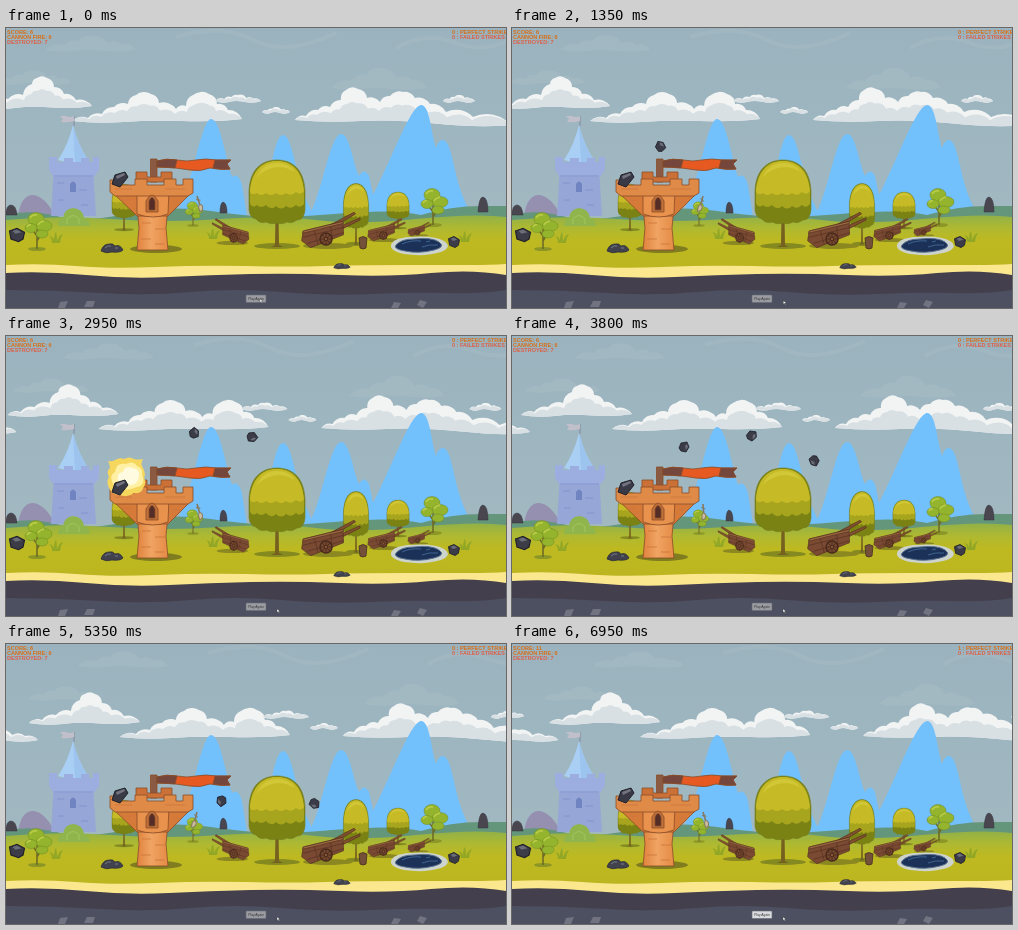
Write an HTML page that moves like this. It is 500 by 280 pixels and loops after 7 s.

```html
<!DOCTYPE html>
<html lang="en">
<head>
<meta charset="utf-8">
<title>Castle cannon</title>
<style>
html, body { margin: 0; width: 100%; height: 100%; overflow: hidden; background: #9fb5bf; }
svg { display: block; width: 100vw; height: 100vh; }
text { font: 800 5.5px "Liberation Sans", Arial, sans-serif; }
</style>
</head>
<body>
<svg viewBox="0 0 500 280">
<defs>
  <linearGradient id="sky" x2="0" y2="1"><stop stop-color="#9ab3be"/><stop offset="1" stop-color="#a5bbc3"/></linearGradient>
  <linearGradient id="grass" x2="0" y2="1"><stop stop-color="#92b148"/><stop offset=".2" stop-color="#aeb931"/><stop offset=".4" stop-color="#beb921"/><stop offset="1" stop-color="#bbb41f"/></linearGradient>
  <linearGradient id="brick" x2="1" y2="0"><stop stop-color="#e0823d"/><stop offset=".45" stop-color="#f0a463"/><stop offset="1" stop-color="#e58b46"/></linearGradient>
  <g id="tree">
    <ellipse cy="24" rx="23" ry="3" fill="#858a20"/>
    <path d="M-1.500-5h3L2 23l4 2h-12l4-2z" fill="#75601f"/>
    <path d="M-28-31C-27-54-14-62 0-62S27-54 28-31V-12Q27-2 20-2 15 2 10 0 5 3 0 1-6 3-11 0-17 2-21-3-27-4-28-12z" fill="#7b8214" stroke="#767c1c" stroke-width=".6"/>
    <path d="M-27-30C-26-52-14-61 0-61S26-52 27-30V-18q-4 5-8 1-5 5-10 1-5 5-10 0-5 5-10-1-5 4-9 0-5 4-7-2z" fill="#a7a51d"/>
    <path d="M-27-31C-25-53-13-61 0-61S25-53 27-31q-3 5-8 1-5 5-10 1-5 4-10 0-5 4-10 0-5 4-9 0-5 3-7-1z" fill="#c6bb26"/>
    <path d="M-21-44Q-14-59 0-59q12 0 18 9Q4-58-8-53q-8 3-13 9z" fill="#d2c737"/>
  </g>
  <g id="bush">
    <ellipse cy="30" rx="9" ry="2" fill="#8c9626"/>
    <path d="M0 30V5M0 22L8 8M0 17L-7 7" fill="none" stroke="#6f6c26" stroke-width="1.6"/>
    <g fill="#93b42c" stroke="#6f8a25" stroke-width=".5">
      <ellipse cx="-1" rx="8" ry="6.500"/><ellipse cx="7" cy="7" rx="8" ry="5.500"/><ellipse cx="-6" cy="9" rx="6" ry="4.500"/><ellipse cx="5" cy="15" rx="6" ry="4"/>
    </g>
    <path d="M-7-1q2-4 7-3M1 6q1-3 6-4M-10 8q1-3 4-2" fill="none" stroke="#b6ca46" stroke-width="1.8"/>
  </g>
  <g id="cart">
    <ellipse cx="1" cy="11" rx="25" ry="3" fill="#8b8821"/>
    <g transform="rotate(-15)" stroke="#54301f" stroke-width=".6">
      <path d="M2-3L36-8l0 2L3 1zM6-9L32-15l1 2L8-6z" fill="#80502f"/>
      <path d="M-26-1L-22-10 19-9 16 4-19 8z" fill="#7a4a33"/>
      <path d="M-24-4L18-3M-21 3L17 2M-11-10L-11 7M6-9L4 5" fill="none"/>
      <path d="M-22-10L19-9 19-7-23-8z" fill="#a06d43"/>
    </g>
    <g fill="none" stroke="#4a2a1c">
      <circle cx="-1" cy="4" r="6" fill="#74482f" stroke-width="1.5"/>
      <path d="M-1-2V10M-7 4H5M-5 0L3 8M3 0L-5 8" stroke-width=".8"/>
      <circle cx="-1" cy="4" r="1.500" fill="#a06b45"/>
    </g>
  </g>
  <g id="rock">
    <path d="M-5-3L0-5 5-2 4 3 1 5-4 3z" fill="#3b3c48" stroke="#20202a" stroke-width=".8"/>
    <path d="M-3-3L0-4 3-2-1-1z" fill="#6b6d79"/>
  </g>
  <g id="stones">
    <path d="M-11 3q2-7 8-7 4-1 6 2 5-2 8 4-3 3-11 2-6 2-11-1z" fill="#41424e" stroke="#282934" stroke-width=".7"/>
    <path d="M-7 0q3-3 6-2M3 0l3 0" stroke="#747886" fill="none"/>
  </g>
  <path id="tuft" d="M-5 4q0-5-3-7 5 1 5 5 0-7 2-9 1 3 1 9 2-6 6-7-3 4-3 9z" fill="#93a726"/>
</defs>

<rect width="500" height="280" fill="url(#sky)"/>
<g id="haze" opacity=".25"></g>
<g id="clouds"></g>

<!-- Far scenery -->
<g fill="#72c0fc">
  <path d="M250 195C263 170 266 108 277 107c9 0 13 40 22 62l12 26zM299 195C316 172 323 107 335 106c9 0 12 30 18 42q5-9 10 0l10 47z"/>
  <path d="M165 195C186 168 194 92 205 91c9 0 14 36 21 58q6-5 10 8l6 38z"/>
  <path d="M350 195C376 162 401 79 415 77c9 0 10 28 15 43 3-10 10-12 14 2 6 19 8 48 28 73z"/>
</g>
<path d="M12 188Q15 167 27 167 39 168 49 188z" fill="#958fb0"/>
<path d="M0 187Q22 181 50 188T120 186 205 183 270 189 340 185 415 187Q445 178 475 178l25 0v29H0z" fill="#64967b"/>
<g fill="#4a4650" stroke="#34333d" stroke-width=".5">
  <path d="M0 187q0-10 5-10t6 10zM214 185q0-10 3-11 4 1 4 11zM472 184q1-15 5-15 5 1 5 15z"/>
</g>
<path d="M0 192Q50 187 105 191T215 191 310 192 410 191 500 189V250H0z" fill="url(#grass)"/>

<!-- Blue castle -->
<path d="M68 98V88" stroke="#8486a0"/>
<path d="M68 88q-5 2-8 0l-6 0 3 3-2 3q6 1 13-1z" fill="#c1bfc9"/>
<path d="M48 139H87L90 188H45z" fill="#95a6d7"/>
<path d="M67 97Q72 117 82 132 67 137 52 132 62 117 67 97z" fill="#a9cff4"/>
<path d="M67 97Q72 117 82 132q-6 2-13 3z" fill="#9cc4ef"/>
<path d="M43 129h8v5h7v-4h9v4h8v-4h8v4h4v-5h6v13l-5 7H48l-5-7z" fill="#9cade0"/>
<path d="M48 148H87M51 155h7M73 162h8M52 172h6M75 177h7" stroke="#8293ca"/>
<path d="M64 164v-8q3-5 6 0v8z" fill="#7184c2"/>
<path d="M52 198q0-7 5-8 1-9 10-10 10 1 11 10 5 1 6 8z" fill="#8fb54c"/>
<path d="M61 196v-5q6-7 12 0v5" fill="none" stroke="#a5c45c"/>

<!-- Field -->
<use href="#tree" transform="translate(118 189) scale(.43 .53)"/>
<use href="#tree" transform="translate(392 190) scale(.4 .42)"/>
<use href="#bush" transform="translate(187 178) scale(.65)"/>
<use href="#bush" transform="translate(427 167)"/>
<use href="#bush" transform="translate(31 191)"/>
<use href="#tree" transform="translate(350 199) scale(.45 .7)"/>
<use href="#tree" transform="translate(271 194)"/>
<use href="#tuft" x="208" y="207"/><use href="#tuft" x="51" y="211"/><use href="#tuft" x="460" y="210"/>
<use href="#cart" transform="translate(227 207) scale(-.63 .72)"/>
<use href="#cart" transform="translate(321 207)"/>
<use href="#cart" transform="translate(378 205) scale(.64)"/>
<use href="#cart" transform="translate(412 203) scale(.4)"/>
<path d="M353 210q4-3 8 0l-1 10q-3 2-6 0z" fill="#755039" stroke="#463022" stroke-width=".8"/>
<path d="M385 217q2-7 19-8 24-2 34 4 9 6-3 11-16 5-37 2-14-3-13-9z" fill="#cdd4cd"/>
<path d="M390 217q5-6 18-6 18-2 25 3 7 5-5 8-15 4-29 1-12-2-9-6z" fill="#1c3158" stroke="#5b7190"/>
<path d="M396 216q8-4 19-3M416 219q7-3 16-2M420 214l4-1" fill="none" stroke="#426a97" stroke-width=".9"/>
<use href="#rock" transform="translate(448 214) scale(1.1)"/>
<use href="#rock" transform="translate(11 207) scale(1.5 1.35)"/>
<use href="#stones" x="106" y="220"/>

<!-- Beach and soil -->
<path d="M0 237Q35 235 70 238T150 239 240 238 320 238 400 237 465 237 500 236V262H0z" fill="#fbe78e"/>
<path d="M0 245Q38 243 80 247T163 249 245 246 335 247 425 245 500 247V280H0z" fill="#433f4d"/>
<path d="M0 262Q48 262 95 265T185 264 276 264 365 266 440 265 500 262V280H0z" fill="#4c5060"/>
<path d="M52 280l2-6 8-1-3 7zM78 279l3-6 8 0-2 6zM385 280l3-6 7 1-3 5zM411 277l3-5 7 2-4 6z" fill="#717480"/>
<use href="#stones" transform="translate(336 238) scale(.75 .6)"/>

<!-- Main tower -->
<ellipse cx="150" cy="221" rx="26" ry="4" fill="#7f7d20"/>
<g stroke="#8a4c28" stroke-width=".8" stroke-linejoin="round">
  <path d="M144.500 131h6.500V154h-6.500z" fill="#8b5a43"/>
  <path d="M151 133q10-3 20-1t19 0 21 0l14 0-4 4 3 5q-11 1-20-1-10 4-20 2-16-3-33-3z" fill="#e65a22"/>
  <path d="M151 133q9-3 20-1l-2 8q-9-1-18-1zM209 132l16 0-4 4 3 5q-8 1-17-1z" fill="#74463c"/>
  <path d="M130 151v-7h11v5h14v-5h11v10h-36z" fill="#cb7138"/>
  <path d="M131 178H162L160 200 162 222H131L133 200z" fill="url(#brick)"/>
  <path d="M106 164L131 188H162L186 164z" fill="#d67a39"/>
  <path d="M131 162H163L162 186Q147 192 131 186z" fill="#e8924d"/>
  <path d="M104 152h10v5h15v-6h12v6h17v-6h12v6h7v-6h10v14l-5 3H109l-5-4z" fill="#e08a48"/>
  <path d="M140 184v-11q6-12 12 0v11z" fill="#c0713a"/>
  <path d="M143 182v-9q3-7 6 0v9z" fill="#542d27"/>
  <path d="M109 161H126M159 161h20M136 195h9M149 201h10M135 211h10M149 216h9M116 172l9 0M167 174h7" stroke="#c8743c"/>
</g>
<g id="pendulum" stroke="#87785f" fill="none">
  <path d="M0 0V12" stroke-width="1.6"/><path d="M-2 3L2 5M-2 11q2-4 4 0 0 5-4 5z" fill="#c8bda0"/>
</g>

<!-- Cannon fire -->
<g id="smoke">
  <path d="M-18 14q-3-6 0-11-3-6 1-9 0-4-2-7 4 1 7-1 5-3 9-1 5-3 10 0 4 1 9 0-3 5 0 9 3 6 1 10 3 5-1 10-1 6-9 5-8 6-15 1-6 2-10-6z" fill="#f6d75e"/>
  <path d="M-14 10q-4-9 2-12 1-10 11-8 7-4 11 2 6 2 5 9 4 10-5 12-13 6-24-3z" fill="#fff0a4"/>
  <path d="M-9 7q-2-8 5-9 2-7 10-4 7 1 6 8-1 9-9 9-9 2-12-4z" fill="#fffbe0"/>
</g>
<path d="M106 156L109 147 119 144 122 149 114 159z" fill="#393a46" stroke="#20212a"/>
<path d="M110 148l8-3 1 2-8 4z" fill="#737480"/>
<g id="shots"></g>

<!-- Interface -->
<g fill="#d96e17"><text x="1" y="6" id="score"></text><text x="1" y="11">CANNON FIRE: 6</text><text x="1" y="16" fill="#de5f45">DESTROYED: 7</text></g>
<g fill="#d96e17"><text x="446" y="6" id="perfect"></text><text x="446" y="11" fill="#de5f45">0 : FAILED STRIKES</text></g>
<rect id="button" x="240" y="267" width="20" height="7.500" rx=".7" stroke="#6a6c73" stroke-width=".6"/>
<text x="250" y="272" text-anchor="middle" style="font-size:3.3px;font-weight:400" fill="#333">Play Again</text>
<path id="cursor" d="M0 0v3.500l1-1 1 1.500.6-.4-.9-1.400h1.300z" fill="#fff" stroke="#222" stroke-width=".3"/>
</svg>

<script>
const el = id => document.getElementById(id);
const place = (node, x, y, more = "") => node.setAttribute("transform", `translate(${x} ${y}) ${more}`);

// Scalloped upper edge with a softly waving base.
function scallop(points) {
  let path = `M${points[0]}`;
  for (let i = 1; i < points.length; i++) {
    const [x, y] = points[i], [px, py] = points[i - 1];
    const r = Math.hypot(x - px, y - py) * .85;
    path += `A${r} ${r} 0 0 1 ${x} ${y}`;
  }
  const [x0, y0] = points[0], [x1, y1] = points.at(-1), w = x1 - x0;
  return path + `Q${x1 - w * .15} ${y1 + 3} ${x1 - w * .35} ${(y0 + y1) / 2 + 1}T${x0 + w * .3} ${y0 + 1}T${x0} ${y0}Z`;
}
function cloud(points) {
  const [x0, y0] = points[0], [x1, y1] = points.at(-1);
  const shade = points.map(([x, y], i) => {
    const base = y0 + (y1 - y0) * (x - x0) / (x1 - x0);
    return [x + (i % 2 ? 1 : -1), base + (y - base) * .55];
  });
  shade[0] = points[0];
  shade[shade.length - 1] = points.at(-1);
  return `<path d="${scallop(points)}" fill="#f2f4f4"/><path d="${scallop(shade)}" fill="#d8e0e4"/>`;
}
const puff = (x, y, w, h) => [[0, 0], [.2, -.35], [.36, -.65], [.5, -1], [.68, -.5], [.84, -.4], [1, 0]]
  .map(([u, v]) => [x + u * w, y + v * h]);

el("clouds").innerHTML = [
  [[-25, 79], [-12, 76], [2, 71], [17, 67], [26, 56], [31, 50], [41, 50], [48, 59], [58, 66], [70, 72], [86, 78]],
  [[66, 93], [82, 90], [96, 86], [108, 79], [122, 76], [130, 67], [145, 66], [153, 75], [170, 81], [180, 78], [187, 67], [203, 66], [211, 76], [222, 82], [236, 91]],
  [[289, 92], [300, 88], [312, 82], [324, 79], [335, 72], [340, 62], [352, 61], [361, 70], [374, 74], [384, 68], [397, 64], [409, 70], [424, 76], [440, 84], [467, 89], [505, 97]],
  puff(209, 73, 46, 6), puff(256, 84, 28, 5), puff(437, 73, 32, 6),
  puff(-96, 96, 80, 10), puff(-92, 72, 42, 5)
].map(cloud).join("");

el("haze").innerHTML = [puff(40, 22, 90, 14), puff(326, 60, 95, 20), puff(-10, 55, 75, 12)]
  .map(p => `<path d="${scallop(p)}" fill="#b6c8ce"/>`).join("")
  + '<path d="M170 9Q215-5 247 12T330 5M390 20q30-17 60-5t65-8" fill="none" stroke="#b4c6cc" stroke-width="4"/>';

// Keys are [seconds, x, y]; finite differences give smooth tangents.
function along(keys, t) {
  if (t <= keys[0][0]) return keys[0].slice(1);
  const i = keys.findIndex(k => k[0] > t);
  if (i < 0) return keys.at(-1).slice(1);
  const a = keys[i - 1], b = keys[i], d = b[0] - a[0], u = (t - a[0]) / d;
  const slope = (j, c) => {
    const p = keys[Math.max(0, j - 1)], q = keys[Math.min(keys.length - 1, j + 1)];
    return (q[c] - p[c]) / (q[0] - p[0]);
  };
  return [1, 2].map(c => a[c] + (b[c] - a[c]) * u * u * (3 - 2 * u)
    + d * u * (1 - u) * ((1 - u) * slope(i - 1, c) - u * slope(i, c)));
}

const far = [[0, 121, 138], [1.05, 185, 98], [2.05, 246, 101], [2.8, 299, 120], [3.8, 310, 176], [4.1, 313, 183]];
const near = [[0, 121, 138], [.9, 172, 111], [1.8, 205, 124], [3.1, 223, 195]];
const shots = [
  { start: .9, keys: far, life: 4.3, spin: 75 },
  { start: 1.85, keys: far, life: 4.4, spin: 55 },
  { start: 2.9, keys: near, life: 3.4, spin: 100 }
];
el("shots").innerHTML = shots.map(() => '<use href="#rock"/>').join("");
const rocks = [...el("shots").children];
const pointer = [[0, 254, 271], [.2, 256, 271], [.65, 274, 271], [.95, 274, 271], [1.4, 271, 273]];

function draw() {
  const t = Math.floor(performance.now() % 7000 / 50) * .05;
  place(el("clouds"), 8.95 * t, 0);
  place(el("haze"), 6 * t, 0);
  place(el("pendulum"), 191, 168, `rotate(${2 - 20 * Math.cos(2 * Math.PI * t)})`);

  shots.forEach(({ start, keys, life, spin }, i) => {
    const age = t - start;
    rocks[i].style.display = age > .15 && age < life ? "" : "none";
    place(rocks[i], ...along(keys, age), `rotate(${spin * age})`);
  });

  const age = Math.min(...shots.map(s => t - s.start + .001).filter(a => a >= 0));
  const smoke = el("smoke");
  smoke.style.display = age < .35 ? "" : "none";
  smoke.style.opacity = Math.min(1, (.35 - age) / .15);
  place(smoke, 121, 138, `scale(${Math.min(1.1, .9 + age * 2)})`);

  const scored = t >= 6.4;
  el("score").textContent = "SCORE: " + (scored ? 11 : 6);
  el("perfect").textContent = (scored ? 1 : 0) + " : PERFECT STRIKES";
  el("button").setAttribute("fill", scored ? "#d8dadd" : "#9a9ca2");
  place(el("cursor"), ...along(pointer, t));
  requestAnimationFrame(draw);
}
draw();
</script>
</body>
</html>
```
